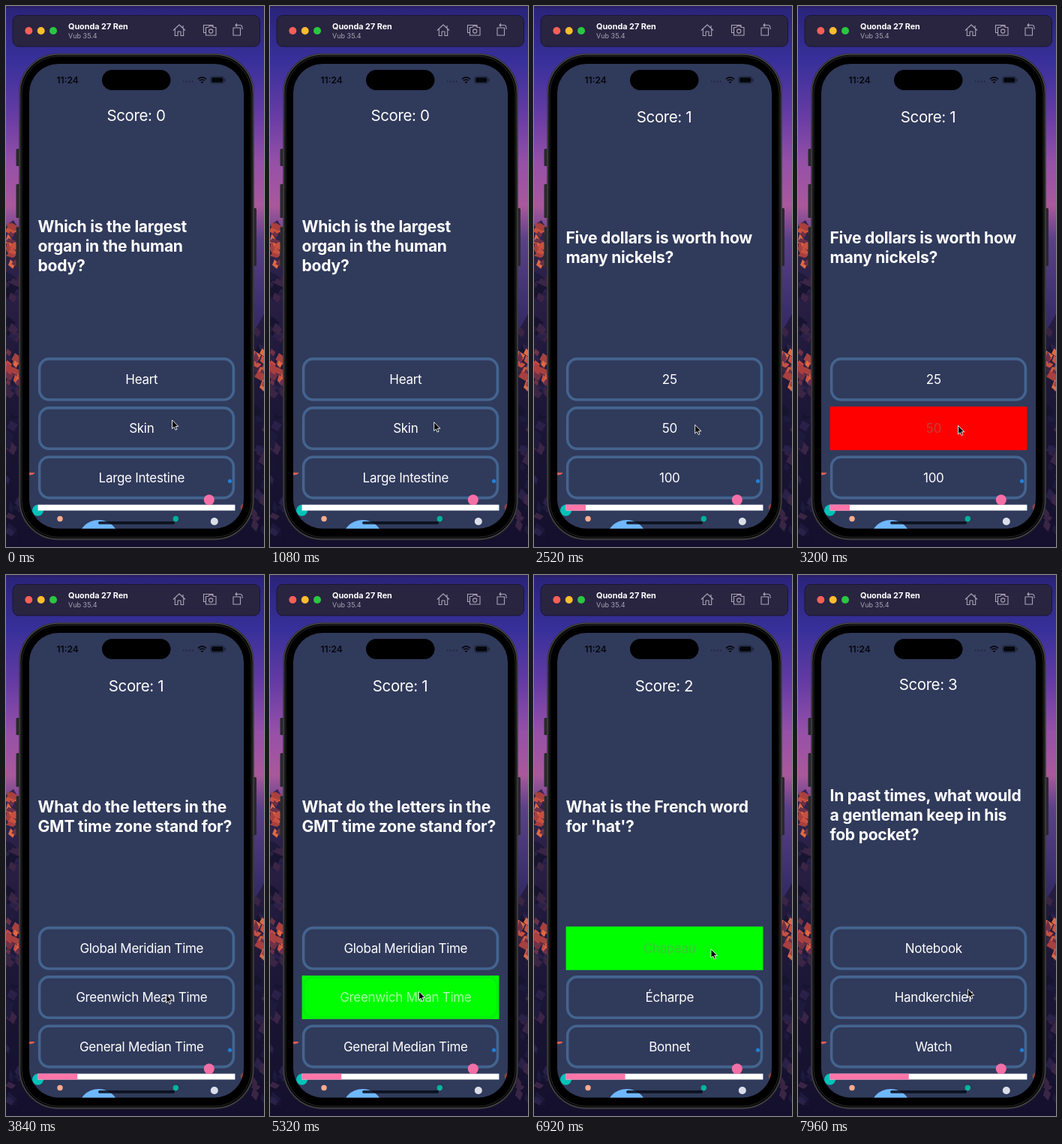
These frames come from a looping animation (344x720 px, 8 s). An HTML page:

```html
<!DOCTYPE html>
<html lang="en">
<head>
<meta charset="utf-8">
<title>Quiz</title>
<style>
html, body { margin: 0; width: 100%; height: 100%; overflow: hidden; background: #14122f; }
svg { display: block; width: 100%; height: 100%; }
text { font-family: Inter, "Open Sans", sans-serif; font-optical-sizing: none; fill: #fff; white-space: pre; }
.question { font-size: 21.1px; font-weight: 700; letter-spacing: -.26px; }
.score { font-size: 20.5px; letter-spacing: -.4px; text-anchor: middle; }
.answer { font-size: 17px; letter-spacing: -.3px; text-anchor: middle; }
.icon { fill: none; stroke: #aaa5b7; stroke-width: 1.1; stroke-linejoin: round; }
</style>
</head>
<body>
<svg viewBox="0 0 344 720">
  <defs>
    <linearGradient id="sky" x2="0" y2="1">
      <stop offset="0" stop-color="#2a2378"/>
      <stop offset=".1" stop-color="#37309a"/>
      <stop offset=".2" stop-color="#653ba4"/>
      <stop offset=".29" stop-color="#9650a8"/>
      <stop offset=".37" stop-color="#a9589c"/>
      <stop offset=".43" stop-color="#5b4188"/>
      <stop offset=".58" stop-color="#352c68"/>
    </linearGradient>
    <linearGradient id="ground" x2="0" y2="1">
      <stop offset="0" stop-color="#33254f"/>
      <stop offset=".4" stop-color="#211a3b"/>
      <stop offset="1" stop-color="#130f2c"/>
    </linearGradient>
    <clipPath id="screen"><rect x="31" y="77" width="286" height="618.5" rx="39"/></clipPath>
  </defs>

  <rect width="344" height="720" fill="url(#sky)"/>
  <path d="M0 0H344V3H0Z" fill="#2b2069"/>
  <path d="M0 292L10 285L22 306V650H322V446L336 424L344 410V720H0Z" fill="url(#ground)"/>
  <g id="rocks"></g>

  <rect x="9" y="12.500" width="329.500" height="41.500" rx="8" fill="#292440" stroke="#171426" stroke-width=".8"/>
  <circle cx="30.300" cy="33" r="5" fill="#ff5f57"/>
  <circle cx="46.700" cy="33" r="5" fill="#febc2e"/>
  <circle cx="63" cy="33" r="5" fill="#28c840"/>
  <text x="83" y="31" font-size="10.800" font-weight="700">Quonda 27 Ren</text>
  <text x="83" y="43" font-size="9" style="fill:#a9a5b5">Vub 35.4</text>
  <g class="icon">
    <path d="M223 32.500L231 25L239 32.500M225.300 31V39.500H229V34H233V39.500H236.700V31M236 29V26"/>
    <path d="M266 35.500H263.500V25.500H276V28M266.500 28.500H269.500L271 26.800H275L276.500 28.500H280V39H266.500Z"/>
    <circle cx="273.200" cy="33.500" r="2.600"/>
    <path d="M303 29H312.500V39H303ZM306 25.500H312Q315 25.500 315 29V31M308 23.500L306 25.500L308 27.500"/>
  </g>

  <g fill="#29282c">
    <rect x="13.500" y="190" width="6" height="23" rx="1.500"/>
    <rect x="13.500" y="237" width="6" height="45" rx="1.500"/>
    <rect x="13.500" y="294" width="6" height="53" rx="1.500"/>
    <rect x="328" y="269" width="6" height="77" rx="1.500"/>
  </g>
  <rect x="18.500" y="64.500" width="311" height="645" rx="51" fill="#000" stroke="#29292b" stroke-width="2.500"/>
  <rect x="18" y="64" width="312" height="646" rx="52" fill="none" stroke="#5b5b5d" stroke-width=".7"/>
  <rect x="21" y="67" width="306" height="640" rx="49" fill="none" stroke="#454547" stroke-width=".6"/>

  <g clip-path="url(#screen)">
    <rect x="31" y="77" width="286" height="619" fill="#303a5b"/>
    <path d="M30 621H38.500Q35.500 625.500 30 623.800Z" fill="#d95f50"/>
    <circle cx="317" cy="667" r="4.500" fill="#8e4148"/>
    <circle cx="42.500" cy="671.200" r="7.500" fill="#00c3b8"/>
    <circle cx="72" cy="682.500" r="3.700" fill="#fbaa8e"/>
    <circle cx="226.300" cy="682.500" r="3.700" fill="#00b39b"/>
    <circle cx="277.800" cy="686" r="5" fill="#dbdee9"/>
    <circle cx="123.500" cy="711.500" r="27.500" fill="#6fb7ff"/>
    <rect x="123" y="686" width="102" height="3.700" rx="1.850" fill="#080b14" opacity=".85"/>
    <rect x="42.600" y="663.700" width="262.800" height="7.800" fill="#fff"/>
    <rect id="progress" x="42.600" y="663.700" height="7.800" fill="#ff75a8"/>
    <text id="score" class="score" x="173.500"></text>
    <g id="question" class="question"></g>
    <g id="answers"></g>
    <circle cx="298.500" cy="632.300" r="2.600" fill="#1b80dc"/>
    <circle cx="270.800" cy="657.300" r="7" fill="#f56fa6"/>
  </g>

  <rect x="128" y="85" width="91.500" height="27" rx="13.500"/>
  <text x="67.500" y="103" font-size="12" font-weight="600" style="fill:#05060b">11:24</text>
  <path d="M236 100.500H250" stroke="#151a2c" stroke-width="1.800" stroke-dasharray="1.800 2.200" opacity=".55"/>
  <path d="M256 97.300Q261.500 92.300 267 97.300M258 99.500Q261.500 96.500 265 99.500" fill="none" stroke="#05060b" stroke-width="1.600"/>
  <path d="M259.700 101.200Q261.500 99.700 263.300 101.200L261.500 103Z"/>
  <rect x="272.500" y="94" width="18.500" height="9" rx="3" fill="none" stroke="#171b2c" stroke-width=".8"/>
  <rect x="274" y="95.300" width="15.500" height="6.400" rx="1.800" fill="#05060b"/>
  <path d="M292.300 97V100.300" stroke="#171b2c"/>

  <path id="cursor" d="M0 0V11.500L2.700 9.200L4.500 13.200L6.400 12.400L4.700 8.400H8.300Z" stroke="#fff" stroke-width=".9" stroke-linejoin="round"/>
</svg>

<script>
const LOOP = 8000;
const PRESS = 90, RECOVER = 300, TITLE_FADE = 250;
const GREEN = '#00ff00', RED = '#ff0000';

const rounds = [
  { start: -1000, score: 0, lines: ['Which is the largest', 'organ in the human', 'body?'],
    answers: ['Heart', 'Skin', 'Large Intestine'], tap: { at: 1240, pick: 1, color: GREEN } },
  { start: 1460, score: 1, lines: ['Five dollars is worth how', 'many nickels?'],
    answers: ['25', '50', '100'], tap: { at: 3165, pick: 1, color: RED } },
  { start: 3385, score: 1, lines: ['What do the letters in the', 'GMT time zone stand for?'],
    answers: ['Global Meridian Time', 'Greenwich Mean Time', 'General Median Time'], tap: { at: 5180, pick: 1, color: GREEN } },
  { start: 5400, score: 2, lines: ['What is the French word', "for 'hat'?"],
    answers: ['Chapeau', 'Écharpe', 'Bonnet'], tap: { at: 6885, pick: 0, color: GREEN } },
  { start: 7105, score: 3, lines: ['In past times, what would', 'a gentleman keep in his', 'fob pocket?'],
    answers: ['Notebook', 'Handkerchief', 'Watch'] }
];

// time, x, y of the pointer tip
const pointer = [
  [0, 221.5, 551], [120, 221.5, 551], [1240, 218.5, 554], [1560, 218, 554],
  [3000, 213.5, 558.5], [3840, 213.5, 558], [5100, 198.5, 554], [5500, 198.5, 554],
  [6500, 236, 498], [7100, 236, 498], [7800, 226.5, 551], [LOOP, 226.5, 551]
];

const $ = id => document.getElementById(id);
const clamp = v => Math.max(0, Math.min(1, v));
const mix = (a, b, k) => a + (b - a) * k;
const smooth = k => k * k * (3 - 2 * k);

function add(parent, tag, attrs) {
  const el = document.createElementNS('http://www.w3.org/2000/svg', tag);
  for (const name in attrs) el.setAttribute(name, attrs[name]);
  return parent.appendChild(el);
}

// Scatters rock facets inside one area of the mountains.
function drawRocks(x, y, width, height, count, tones) {
  let seed = 11 + x + y;
  const random = () => (seed = seed * 16807 % 2147483647) / 2147483647;
  random();
  for (let i = 0; i < count; i++) {
    const w = 4 + random() * 7, h = 6 + random() * 14;
    add($('rocks'), 'path', {
      d: `M${x + random() * width} ${y + random() * height}l${w} ${h * .5}l${-w * .5} ${h * .5}l${-w} ${-h * .4}Z`,
      fill: tones[Math.floor(random() * tones.length)]
    });
  }
}

const lines = [0, 1, 2].map(() => add($('question'), 'text', { x: 42.5 }));
const buttons = [0, 1, 2].map(i => {
  const y = 467.8 + i * 65.3;
  return {
    flash: add($('answers'), 'rect', { x: 42.6, y, width: 262.8, height: 58 }),
    border: add($('answers'), 'rect', { x: 44.6, y: y + 1.8, width: 258.8, height: 54.4, rx: 13, fill: 'none', stroke: '#44648f', 'stroke-width': 3.6 }),
    label: add($('answers'), 'text', { class: 'answer', x: 180.8, y: y + 35.3 })
  };
});

let shown = -1;
function showRound(index) {
  if (index === shown) return;
  shown = index;
  const { lines: words, answers, score } = rounds[index];
  const tall = words.length === 3;
  lines.forEach((line, i) => {
    line.textContent = words[i] || '';
    line.setAttribute('y', (tall ? 300.7 : 316.3) + i * 26);
  });
  buttons.forEach((button, i) => button.label.textContent = answers[i]);
  $('score').textContent = 'Score: ' + score;
  $('score').setAttribute('y', tall ? 153 : 155);
  $('progress').setAttribute('width', index * 26.28);
}

function movePointer(t) {
  const i = Math.max(1, pointer.findIndex(p => p[0] > t));
  const [t0, x0, y0] = pointer[i - 1], [t1, x1, y1] = pointer[i];
  const k = smooth(clamp((t - t0) / (t1 - t0)));
  $('cursor').setAttribute('transform', `translate(${mix(x0, x1, k)} ${mix(y0, y1, k)})`);
}

function render(t) {
  const index = rounds.findLastIndex(r => t >= r.start);
  const round = rounds[index];
  showRound(index);

  const fade = clamp((t - round.start) / TITLE_FADE);
  const titleAlpha = 1 - (1 - fade) ** 2.5;
  const previous = index ? rounds[index - 1].tap : null;

  buttons.forEach(({ flash, border, label }, i) => {
    const tap = round.tap;
    const active = tap && tap.pick === i && t >= tap.at - PRESS;
    const lit = active && t >= tap.at;
    const last = active ? tap : previous && previous.pick === i ? previous : null;
    const recovery = last ? clamp((t - last.at) / RECOVER) : 1;

    flash.setAttribute('fill', lit ? tap.color : 'none');
    border.setAttribute('opacity', recovery ** 3);
    if (active) {
      const tone = Math.round(mix(112, 255, smooth(clamp(recovery * 2))));
      label.style.fill = `rgb(${tone} ${tone} ${tone})`;
      label.setAttribute('opacity', mix(.36, 1, recovery));
    } else {
      label.style.fill = '#fff';
      label.setAttribute('opacity', titleAlpha);
    }
  });
  movePointer(t);
}

function tick() {
  render(performance.now() % LOOP);
  requestAnimationFrame(tick);
}

const lava = ['#c9503f', '#dd6a45', '#a8403f', '#6b3148'];
const shade = ['#1d1a3c', '#2a2148', '#17142f', '#3a2545'];
drawRocks(0, 288, 18, 50, 14, lava);
drawRocks(0, 345, 18, 350, 50, shade);
drawRocks(0, 455, 18, 45, 16, lava);
drawRocks(330, 420, 16, 275, 40, shade);
drawRocks(330, 455, 16, 45, 16, lava);
tick();
</script>
</body>
</html>
```
